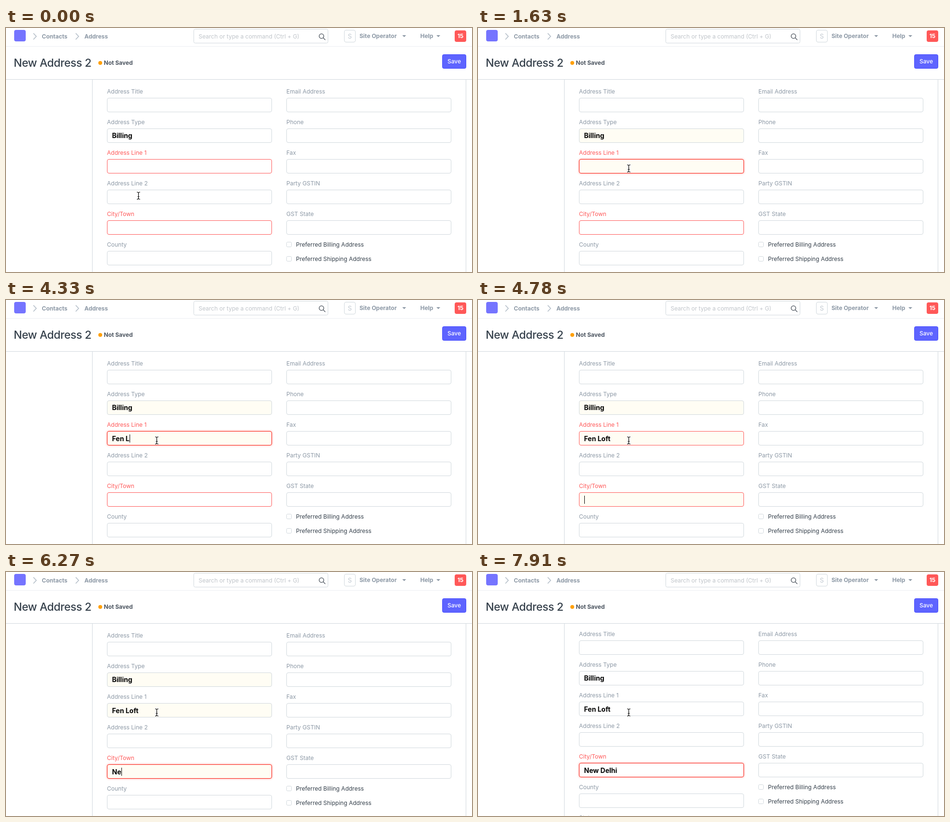
An HTML page that plays this animation: 969 px wide and 510 px high, repeating every 8 s.

```html
<!DOCTYPE html>
<html lang="en">
<head>
<meta charset="utf-8">
<title>New address form</title>
<style>
html, body { margin: 0; width: 100%; height: 100%; overflow: hidden; background: #fff; }
svg { display: block; }
text { font: 12px Inter, sans-serif; font-optical-sizing: none; fill: #8d99a6; white-space: pre; }
.bold { font-weight: 700; }
.dark { fill: #36414c; }
.mid { text-anchor: middle; }
.title { font-size: 23px; font-weight: 500; letter-spacing: -.02em; }
.value { font-size: 14px; font-weight: 700; fill: #000; }
.line, .box { fill: none; stroke: #d1d8dd; }
.box { fill: #fff; }
.error .box { stroke: #ff5858; }
.error text:first-child { fill: #ff5858; }
.filled .box { fill: #fffdf4; }
.blurring .box { stroke: #bcc5cd; }
.glow .box { stroke: #fa1e14; filter: drop-shadow(0 0 2px rgba(255, 40, 30, .45)); }
</style>
</head>
<body>
<svg width="969" height="510" viewBox="0 0 969 510">
  <path class="line" d="M179.5 108V510M956.5 108V510"/>
  <g id="form">
    <g id="fields"></g>
    <rect class="box" x="583.5" y="447.5" width="10" height="10" rx="2"/>
    <text class="dark" x="603" y="457">Preferred Billing Address</text>
    <rect class="box" x="583.5" y="477.5" width="10" height="10" rx="2"/>
    <text class="dark" x="603" y="487">Preferred Shipping Address</text>
    <rect id="caret" width="1" height="17"/>
  </g>

  <path class="line" d="M0 107.5H969"/>
  <path class="line" style="stroke:#ebeff2" d="M0 38.5H969"/>
  <rect x="17" y="4" width="24" height="24" rx="4" fill="#7574ff"/>
  <path d="M57 11l6 6.5l-6 6.5M145 11l6 6.5l-6 6.5" fill="none" stroke="#b4bec8" stroke-width="1.6"/>
  <text class="bold" x="74.5" y="22">Contacts</text>
  <text class="bold" x="163" y="22">Address</text>
  <rect class="box" x="390.5" y="2.5" width="279" height="29" rx="3"/>
  <text x="400.5" y="22" style="fill:#c0c5ca">Search or type a command (Ctrl + G)</text>
  <g fill="none" stroke="#4a525b" stroke-width="1.3">
    <circle cx="656" cy="17" r="4.8"/>
    <path d="M659.5 20.5l4.5 4.5"/>
  </g>
  <rect class="box" x="703.5" y="4.5" width="23" height="25" rx="3.5"/>
  <text class="mid" x="715" y="22" style="font-size:13px;fill:#c0c8d0">S</text>
  <text class="bold" x="735" y="21">Site Operator</text>
  <text class="bold" x="861.5" y="21">Help</text>
  <path d="M824 15h8l-4 4zM895 15h8l-4 4z" fill="#8d99a6"/>
  <rect x="933" y="5" width="24" height="24" rx="4" fill="#ff5858"/>
  <text class="bold mid" x="945" y="21" style="fill:#fff">15</text>

  <text class="title dark" x="16" y="81">New Address 2</text>
  <circle cx="196" cy="73" r="4" fill="#ffa00a"/>
  <text class="bold" x="203.5" y="77" style="fill:#4c5560">Not Saved</text>
  <rect x="907.5" y="55.5" width="49" height="29" rx="3" fill="#5e64ff" stroke="#444bff"/>
  <text class="mid" x="932" y="74" style="fill:#fff;font-weight:500">Save</text>

  <g id="mouse" fill="none" stroke-linecap="round">
    <path id="beam" d="M-3-7.5q3 0 3 2.5V5q0 2.5-3 2.5M3-7.5q-3 0-3 2.5M3 7.5q-3 0-3-2.5M-1.5 2h3" stroke="#fff" stroke-width="2.6"/>
    <use href="#beam"/>
  </g>
</svg>
<script>
const LOOP = 8000;
const $ = id => document.getElementById(id);

function addField(label, x, top) {
  const group = document.createElementNS('http://www.w3.org/2000/svg', 'g');
  group.innerHTML = `<text x="${x}" y="${top - 9}">${label}</text>
    <rect class="box" x="${x + .5}" y="${top + .5}" width="342" height="29" rx="3.5"/>
    <text class="value" x="${x + 10.5}" y="${top + 21}"></text>`;
  $('fields').append(group);
  return { group, top, value: group.lastElementChild };
}

const addColumn = (labels, x) => labels.map((label, i) => addField(label, x, 146 + 64 * i));
const [title, type, line1, , city] = addColumn(
  ['Address Title', 'Address Type', 'Address Line 1', 'Address Line 2', 'City/Town', 'County', 'State'], 210);
addColumn(['Email Address', 'Phone', 'Fax', 'Party GSTIN', 'GST State'], 583);
type.value.textContent = 'Billing';
type.value.setAttribute('y', 230);

// Each track lists [start time, value]; a value holds until the next one.
const line1Text = [[0, ''], [3730, 'F'], [3880, 'Fe'], [4030, 'Fen'], [4180, 'Fen '],
  [4330, 'Fen L'], [4480, 'Fen Lof'], [4630, 'Fen Loft']];
const cityText = [[0, ''], [5370, 'N'], [5520, 'Nw'], [6120, 'N'], [6270, 'Ne'],
  [6420, 'New '], [6570, 'New D'], [6870, 'New Del'], [7310, 'New Delhi']];
const caretOn = [[0, 0], [300, 1], [750, 0], [1040, 1], [1630, 0], [2080, 1], [2530, 0],
  [3130, 1], [3580, 0], [3730, 1], [7910, 0]];
const focused = [[0, title], [1040, line1], [4780, city]];
const at = (track, t) => track.findLast(([start]) => start <= t)[1];

function setState(field, states) {
  for (const name in states) field.group.classList.toggle(name, states[name]);
}

function draw(t) {
  const scrolled = t >= 7910;
  const filledSince = start => t >= start && !scrolled;
  $('form').setAttribute('transform', `translate(0 ${scrolled ? -3 : 0})`);

  line1.value.textContent = at(line1Text, t);
  city.value.textContent = at(cityText, t);
  setState(title, { blurring: t >= 1040 && t < 1180 });
  setState(type, { filled: filledSince(1040) });
  setState(line1, { filled: filledSince(1040), error: t < 4930, glow: t >= 1180 && t < 4780 });
  setState(city, { filled: filledSince(4780), error: true, glow: t >= 5070 });

  const field = at(focused, t);
  const textWidth = field.value.textContent ? field.value.getComputedTextLength() : 0;
  $('caret').setAttribute('x', 221 + Math.round(textWidth - .5 * (textWidth > 0)));
  $('caret').setAttribute('y', field.top + 7);
  $('caret').setAttribute('opacity', at(caretOn, t));

  // The pointer is sampled every 150 ms and arrives at 900.
  const step = Math.min(5, Math.max(0, Math.floor((t - 150) / 150))) / 5;
  const ease = step * step * (3 - 2 * step);
  $('mouse').setAttribute('transform', `translate(${275.5 + 38 * ease} ${350.5 - 57 * ease})`);
}

// The second copy of the pointer is the dark core over its white halo.
const core = $('beam').cloneNode();
core.removeAttribute('id');
core.setAttribute('stroke', '#000');
core.setAttribute('stroke-width', 1.2);
$('mouse').lastElementChild.replaceWith(core);

function tick() {
  draw(performance.now() % LOOP);
  requestAnimationFrame(tick);
}
tick();
</script>
</body>
</html>
```
